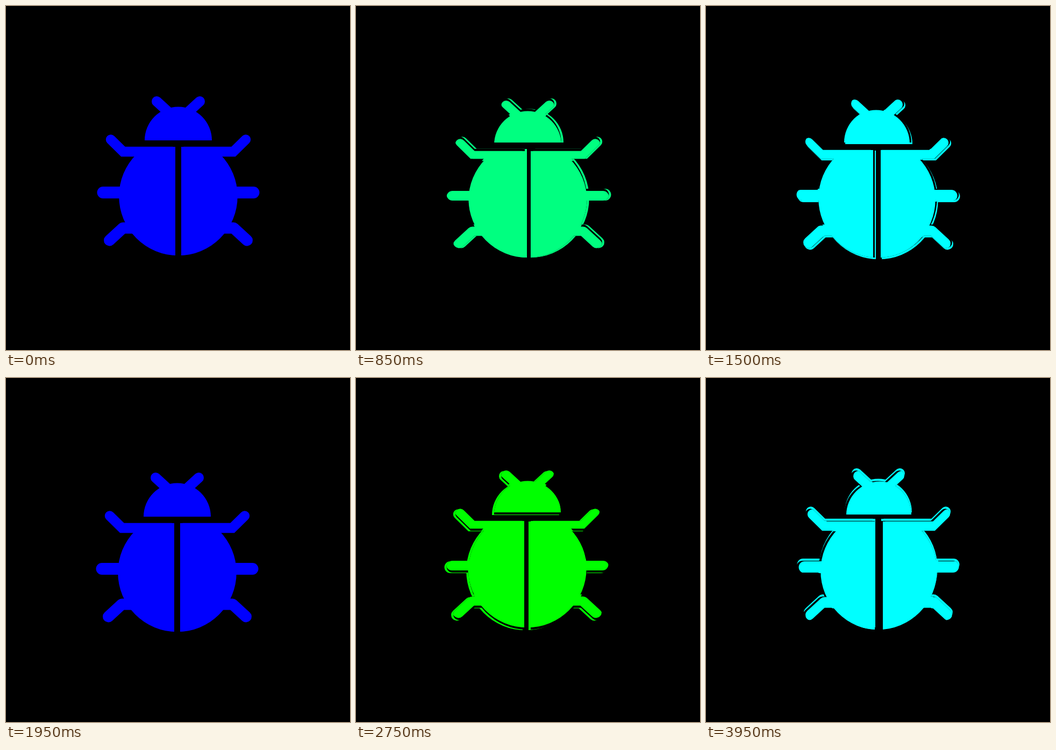
An HTML page with a canvas that plays this animation: 640 by 640 pixels, repeating every 4 s.

```html
<!DOCTYPE html>
<html lang="en">
<head>
<meta charset="utf-8">
<title>Beetle</title>
<style>
html, body { margin: 0; width: 100%; height: 100%; overflow: hidden; background: #000; }
canvas { display: block; width: 100vmin; height: 100vmin; }
</style>
</head>
<body>
<canvas id="stage" width="640" height="640"></canvas>
<script>
const SIZE = 640, LOOP = 4000, STEP = 50, MID = 320.5;
const BLUE = '#00f', CYAN = '#0ff', SPRING = '#00ff80', GREEN = '#0f0';
const COLORS = [
  [0, BLUE], [300, CYAN], [600, SPRING], [1100, CYAN], [1600, BLUE],
  [2200, CYAN], [2400, SPRING], [2600, GREEN], [3600, SPRING], [3800, CYAN]
];
const CENTER = { x: -1, y: 4 }, RADIUS = 4, PHASE = 15, LEAD = 90;

const ctx = document.getElementById('stage').getContext('2d');

function layer() {
  const c = document.createElement('canvas');
  c.width = c.height = SIZE;
  return c.getContext('2d');
}

function limb(g, width, join, points) {
  g.lineWidth = width;
  g.lineJoin = join;
  for (const side of [1, -1]) {
    g.beginPath();
    for (const [x, y] of points) g.lineTo(MID + side * (x - MID), y);
    g.stroke();
  }
}

function makeBeetle() {
  const g = layer();
  g.fillStyle = g.strokeStyle = '#fff';
  g.lineCap = 'round';

  // body, cut flat at the top
  g.save();
  g.beginPath();
  g.rect(0, 262, SIZE, SIZE);
  g.clip();
  g.beginPath();
  g.arc(MID, 354, 110.3, 0, 2 * Math.PI);
  g.fill();
  g.restore();

  limb(g, 18.5, 'miter', [[195, 248.5], [218, 271], [310, 271]]);
  limb(g, 22, 'round', [[180.5, 347], [250, 347]]);
  limb(g, 21, 'round', [[192.5, 436], [217.5, 413], [250, 413]]);
  g.clearRect(314.5, 256, 11.5, 220);

  // head
  g.beginPath();
  g.arc(MID, 250, 62.5, Math.PI, 2 * Math.PI);
  g.fill();
  limb(g, 19, 'round', [[280.5, 177.5], [305, 200]]);
  return g.canvas;
}

const beetle = makeBeetle();
const ink = layer(), overlap = layer();

// whole-pixel position on the circle
function orbit(deg) {
  const a = deg * Math.PI / 180;
  return {
    x: Math.round(CENTER.x + RADIUS * Math.sin(a)),
    y: Math.round(CENTER.y - RADIUS * Math.cos(a))
  };
}

function stamp(g, at, mode) {
  g.globalCompositeOperation = mode;
  g.drawImage(beetle, at.x, at.y);
}

function colorAt(t) {
  let color = BLUE;
  for (const [start, c] of COLORS) if (t >= start) color = c;
  return color;
}

function draw(t) {
  const color = colorAt(t);
  const angle = 360 * t / LOOP + PHASE;
  ink.clearRect(0, 0, SIZE, SIZE);
  stamp(ink, orbit(angle), 'source-over');

  // inside the central copy only its overlap with the leading copy shows
  if (color !== BLUE) {
    overlap.clearRect(0, 0, SIZE, SIZE);
    stamp(overlap, CENTER, 'source-over');
    stamp(overlap, orbit(angle + LEAD), 'destination-in');
    stamp(ink, CENTER, 'destination-out');
    ink.globalCompositeOperation = 'source-over';
    ink.drawImage(overlap.canvas, 0, 0);
  }

  ink.globalCompositeOperation = 'source-in';
  ink.fillStyle = color;
  ink.fillRect(0, 0, SIZE, SIZE);

  ctx.fillStyle = '#000';
  ctx.fillRect(0, 0, SIZE, SIZE);
  ctx.drawImage(ink.canvas, 0, 0);
}

const began = performance.now();
function tick() {
  const t = (performance.now() - began) % LOOP;
  draw(Math.floor(t / STEP) * STEP);
  requestAnimationFrame(tick);
}
tick();
</script>
</body>
</html>
```
